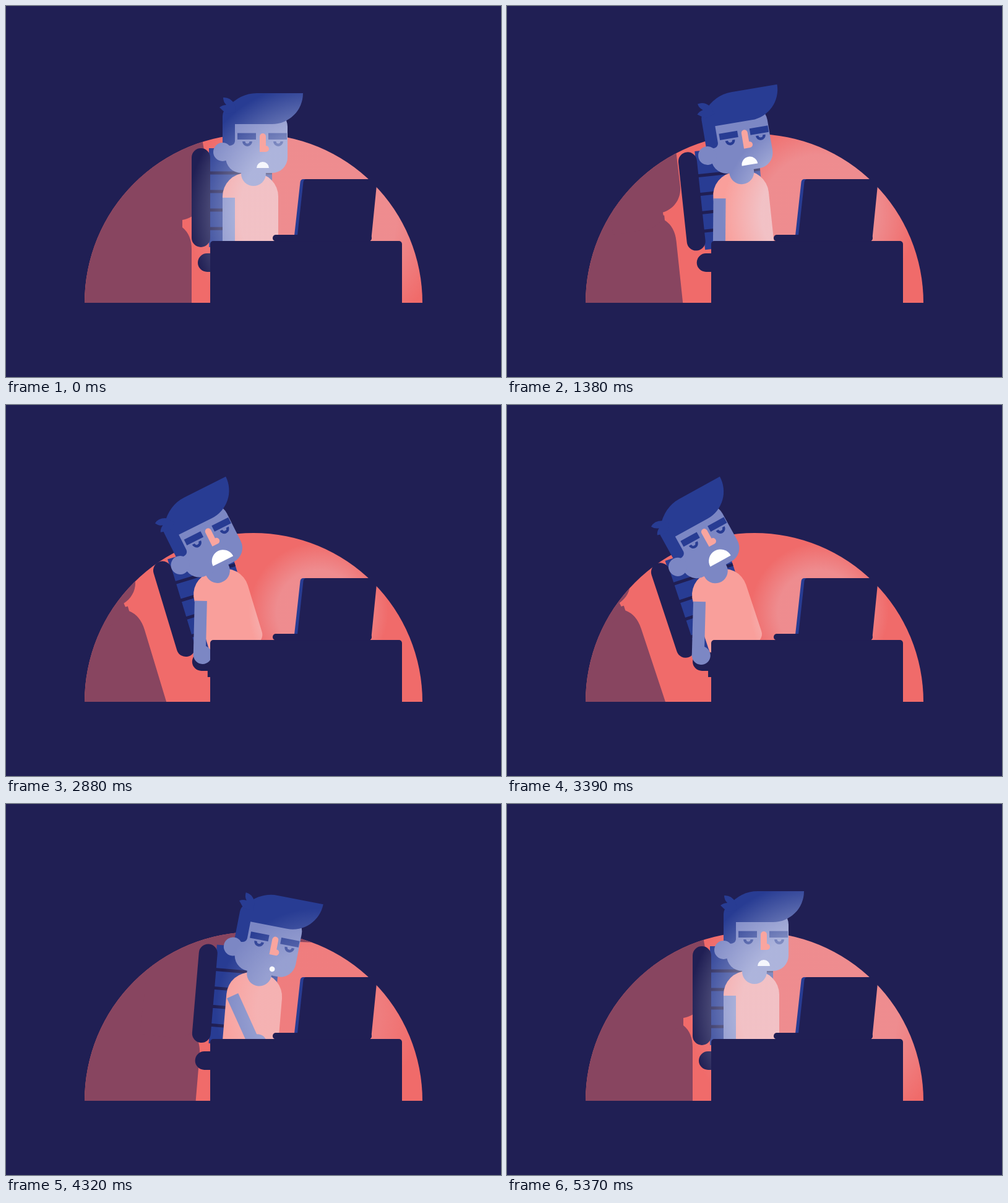
Write an HTML page with a canvas that moves like this. It is 800 by 600 pixels and loops after 5.4 s.

```html
<!DOCTYPE html>
<html>
<head>
<meta charset="utf-8">
<style>
  html, body { margin: 0; width: 800px; height: 600px; overflow: hidden; background: #201f54; }
  canvas { display: block; }
</style>
</head>
<body>
<canvas id="stage" width="800" height="600"></canvas>
<script>
const LOOP = 5400, DROP = 3700;
const NAVY = '#201f54', BLUE = '#283c93', CORAL = '#f06b6a', SHADOW = '#884560';
const SKIN = '#7c87c4', SHIRT = '#f99f9b', NOSE = '#f9a59f';

const stage = document.getElementById('stage').getContext('2d');
const layer = Object.assign(document.createElement('canvas'), { width: 800, height: 600 });
const figure = layer.getContext('2d');

const mix = (a, b, u) => a + (b - a) * u;

// Rises smoothly from 0 to 1 between two times.
function ease(t, from, to) {
  const u = Math.min(1, Math.max(0, (t - from) / (to - from)));
  return (1 - Math.cos(Math.PI * u)) / 2;
}

// Rises between the first two times and falls between the last two.
const pulse = (t, a, b, c, d) => ease(t, a, b) * (1 - ease(t, c, d));

// Falls from 1 and swings around 0, at rest when the loop ends.
function spring(t) {
  const u = Math.max(0, t - DROP);
  return Math.cos(2 * Math.PI * u / 1320) * Math.exp(-0.0014 * u) * (1 - u / (LOOP - DROP));
}

// Slow slide back into sleep, then a startled swing upright.
function poseAt(t) {
  const recline = ease(t, 0, 3550);
  const back = recline * (1 - ease(t, DROP, 4850));
  const lean = 18.4 * recline * spring(t);
  const pout = pulse(t, 3420, 3720, 4700, 5340);
  return {
    lean, pout,
    slide: -10 * back,
    head: lean * (lean < 0 ? 1.3 : 0.58),
    lift: lean * 0.22,
    arm: 25 * pulse(t, 3850, 4320, 4450, 5100) - 1.5 * back,
    mouth: mix(10 + 9 * back, 3.5 + 2 * back, pout),
    glow: 112 + 100 * (1 - Math.abs(lean) / 18.4) ** 2,
    light: 1 - 0.45 * pulse(t, 3900, 4250, 4400, 4900)
  };
}

function fill(c, color, shape) {
  c.fillStyle = color;
  if (typeof shape === 'string') return c.fill(new Path2D(shape));
  c.beginPath();
  shape(c);
  c.fill();
}
const rect = (c, color, x, y, w, h, r = 0) => fill(c, color, p => p.roundRect(x, y, w, h, r));
const disc = (c, color, x, y, r) => fill(c, color, p => p.arc(x, y, r, 0, 7));

// Positive degrees turn counterclockwise.
function rotate(c, degrees, x, y) {
  c.translate(x, y);
  c.rotate(-degrees * Math.PI / 180);
  c.translate(-x, -y);
}

function scoped(c, draw) {
  c.save();
  draw();
  c.restore();
}

function halo(c, radius, alpha) {
  const g = c.createRadialGradient(505, 335, radius * 0.6, 505, 335, radius);
  g.addColorStop(0, `rgba(233,235,249,${alpha})`);
  g.addColorStop(1, 'rgba(233,235,249,0)');
  return g;
}

function poseBody(c, p) {
  c.translate(p.slide, 0);
  rotate(c, p.lean, 365, 435);
}

function poseHead(c, p) {
  poseBody(c, p);
  rotate(c, p.head, 400, 271);
}

function drawBackdrop(c, p) {
  scoped(c, () => {
    c.beginPath();
    c.arc(400, 480, 273, Math.PI, 0);
    c.clip();
    rect(c, CORAL, 0, 0, 800, 600);
    rect(c, halo(c, p.glow, 0.26 * p.light), 0, 0, 800, 600);
    c.translate(p.slide, 0);
    rotate(c, p.lean, 163, 605);
    fill(c, SHADOW, 'M-300 900V-100H240V350H285V358Q300 370 300 394V900Z');
    rotate(c, p.lean * 0.4, 262, 385);
    fill(c, SHADOW, 'M200 370V-100H460V190L345 200L317 215L321 238L319 305' +
      'C319 328 304 343 285 346V358L262 370Z');
  });
}

function drawChair(c) {
  rect(c, BLUE, 328, 230, 102, 160);
  for (let y = 267.5; y < 380; y += 30) rect(c, NAVY, 328, y, 102, 5);
  rect(c, NAVY, 300, 230, 30, 160, 15);
}

function drawTorso(c) {
  rect(c, SHIRT, 350, 270, 90, 132, [38, 38, 15, 15]);
  disc(c, SKIN, 400, 271, 20);
}

// The shoulder follows the body while the arm keeps its own angle.
function drawArm(c, p) {
  poseBody(c, p);
  rotate(c, p.arm - p.lean, 360, 310);
  rect(c, SKIN, 350, 310, 20, 90);
  disc(c, SKIN, 365, 397, 15);
}

function drawHead(c, p) {
  rect(c, SKIN, 355, 170, 100, 100, 25);
  fill(c, BLUE, 'M350 224V178Q350 170 357 165Q378 141 405 141H480A50 50 0 0 1 430 191' +
    'H370V219Q369 226 360 226Z');
  scoped(c, () => {
    rotate(c, p.lean * 1.5, 368, 168);
    fill(c, BLUE, 'M356 174Q350 169 345 164Q350 160 356 160Q351 155 351 148Q362 147 369 158L372 172Z');
  });
  disc(c, SKIN, 350, 236, 15);
}

function drawFace(c, p) {
  c.translate(0, -p.lift);
  c.strokeStyle = BLUE;
  c.lineWidth = 4.5;
  for (const x of [374, 424]) {
    rect(c, BLUE, x, 205.5, 30, 10.5);
    c.beginPath();
    c.arc(x + 16, 219, 5.7, 0, Math.PI);
    c.stroke();
  }
  const r = p.mouth, x = 415 + 4 * p.pout, y = mix(262 + (r - 10) * 0.35, 258.5, p.pout);
  fill(c, '#fff', m => {
    m.arc(x, y, r, Math.PI, 0);
    m.ellipse(x, y, r, r * p.pout, 0, 0, Math.PI);
  });
}

function drawNose(c, p) {
  c.translate(0, -p.lift);
  fill(c, NOSE, 'M410 211A5 5 0 0 1 420 211V226A5 5 0 0 1 420 236H410Z');
}

function drawFigure(p) {
  const c = figure;
  c.clearRect(0, 0, 800, 600);
  scoped(c, () => { poseBody(c, p); drawChair(c); });
  rect(c, NAVY, 310 + p.slide, 400, 60, 30, 15);
  rect(c, NAVY, 335 + p.slide, 428, 40, 12);
  scoped(c, () => { poseBody(c, p); drawTorso(c); });
  scoped(c, () => drawArm(c, p));
  scoped(c, () => { poseHead(c, p); drawHead(c, p); drawFace(c, p); });
  scoped(c, () => {
    c.globalCompositeOperation = 'source-atop';
    rect(c, halo(c, p.glow, 0.45 * p.light), 0, 0, 800, 600);
  });
  scoped(c, () => { poseHead(c, p); drawNose(c, p); });
}

function drawDesk(c) {
  rect(c, NAVY, 330, 380, 310, 101, [5, 5, 0, 0]);
  fill(c, BLUE, 'M466 371L475.5 285Q476 280 481 280H490L480 371Z');
  fill(c, NAVY, 'M471 371L480.5 285Q481 280 486 280H600L590.5 375Q590 381 585 381H471Z');
  rect(c, NAVY, 431, 370, 160, 10.5, 5);
}

function frame(time) {
  const pose = poseAt(time % LOOP);
  rect(stage, NAVY, 0, 0, 800, 600);
  drawBackdrop(stage, pose);
  drawFigure(pose);
  stage.drawImage(layer, 0, 0);
  drawDesk(stage);
}

const start = performance.now();
function tick() {
  frame(performance.now() - start);
  requestAnimationFrame(tick);
}
tick();
</script>
</body>
</html>
```
